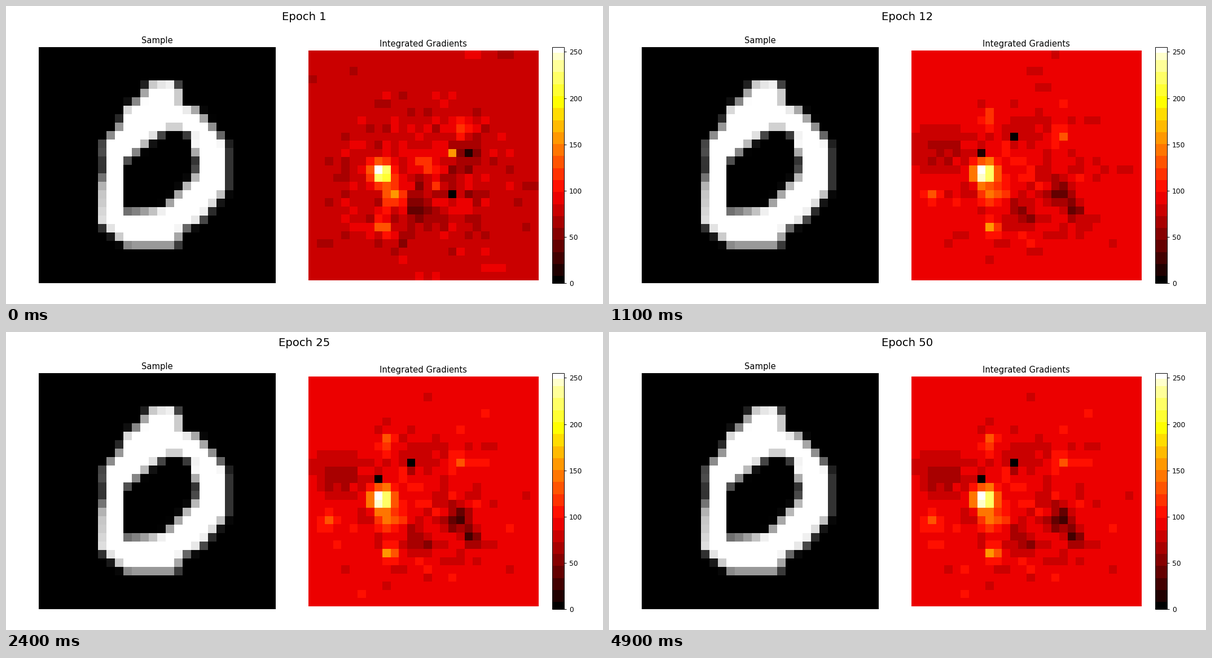
A matplotlib script that plays this animation: 1058x529 px, repeating every 5 s.

```python
import numpy as np
import matplotlib.pyplot as plt
from matplotlib.animation import FuncAnimation
from matplotlib.colors import ListedColormap
from matplotlib.path import Path

W, H = 1058, 529
N = 28
FRAMES = 50
rng = np.random.default_rng(7)

# Contours of the handwritten zero, in cells.
OUTER = [(13.2, 4.2), (15.6, 4), (16.8, 5), (16.8, 7), (18.5, 7.2), (21, 10),
         (22.2, 11.5), (22.2, 17), (19.2, 20.6), (16.9, 21.7), (16.3, 23.6),
         (10.4, 23.6), (7.1, 20.8), (7.3, 16), (7.8, 15), (7.7, 11.2),
         (9.6, 9.4), (10.2, 7.2), (12, 6.2), (12.7, 4.8)]
INNER = [(10, 13.7), (14.2, 10.4), (16, 9.6), (18.1, 10.5), (18, 12),
         (18.8, 13.2), (18.7, 15), (16.6, 17.2), (14.9, 19), (12.5, 19.4),
         (10, 19.6)]

# Salient spots: (row, column, radius, gain).
CORE = [(14.4, 8.4, 0.85, 210)]
EARLY = [(17, 10, 1, 75), (21, 8.5, 0.6, 70), (13.2, 13.8, 0.8, 55),
         (12, 17, 0.4, 75), (8.7, 18, 0.8, 45), (17, 17, 0.4, -78),
         (12, 19, 0.8, -55), (19, 12.8, 0.9, -60)]
LATE = [(17, 9.3, 1, 50), (21, 9.3, 0.6, 75), (7.5, 9, 0.6, 45),
        (17, 2, 0.8, 35), (10, 18, 0.6, 40), (10, 12, 0.5, -90),
        (12, 8, 0.4, -85), (11.5, 3.5, 1.7, -28), (16.8, 17.6, 0.9, -65),
        (19, 19.3, 0.7, -65), (19.7, 12.7, 1.2, -35), (9, 12.5, 1.2, -20)]

yy, xx = np.mgrid[:N, :N]


def bump(row, col, radius):
    return np.exp(-((yy - row) ** 2 + (xx - col) ** 2) / (2 * radius ** 2))


def coverage(points, sub=10):
    """Share of each cell that lies inside a polygon."""
    c = (np.arange(N * sub) + 0.5) / sub
    grid = np.stack(np.meshgrid(c, c), -1).reshape(-1, 2)
    inside = Path(points + points[:1]).contains_points(grid)
    return inside.reshape(N, sub, N, sub).mean((1, 3))


def attribution_map(base, speckle, spots):
    """Faint horizontal streaks, speckle around the digit, and the spots."""
    n = rng.normal(size=(N, N))
    streaks = (n + np.roll(n, 1, 1) + np.roll(n, 2, 1)) / 3 ** 0.5
    field = base + 2.5 * streaks + speckle * near * rng.normal(size=(N, N))
    return field + sum(gain * bump(r, c, size) for r, c, size, gain in spots)


def banded_hot():
    v = np.arange(256)
    colors = plt.get_cmap("hot")(8 + (v - 8) // 13 * 13)
    colors[v < 8] = (0, 0, 0, 1)
    colors[v >= 250] = (1, 1, 1, 1)
    return ListedColormap(colors)


near = bump(14.5, 13, 7)
phase = rng.uniform(0, 2 * np.pi, (N, N))
late = attribution_map(91.5, 9, CORE + LATE)
early = attribution_map(79.5, 13, CORE + EARLY)


def attribution(i):
    i = min(i, FRAMES - 2)
    w = np.exp(-i / 5)
    dip = 14.5 * np.exp(-((i - 4) / 2.2) ** 2)
    wobble = 2 * np.exp(-i / 12) * np.sin(phase + 1.3 * i) * (0.4 + near)
    return np.clip(w * early + (1 - w) * late - dip + wobble, 0, 255)


fig = plt.figure(figsize=(12, 6), dpi=W / 12, facecolor="white")


def panel(x, w, h, mid=282.85):
    """Axes at left edge x, vertically centred on mid, in pixels."""
    return fig.add_axes([x / W, 1 - (mid + h / 2) / H, w / W, h / H])


def show(ax, img, name, **kw):
    ax.set_title(name, fontsize=12)
    ax.axis("off")
    return ax.imshow(img, interpolation="nearest", aspect="auto", **kw)


zero = coverage(OUTER) - coverage(INNER)
show(panel(58.15, 419.2, 419.2), zero, "Sample", cmap="gray", vmin=0, vmax=1)
heat = show(panel(535.6, 407.4, 407.4), attribution(0), "Integrated Gradients",
            cmap=banded_hot(), vmin=0, vmax=255)
fig.colorbar(heat, cax=panel(968.4, 20.96, 419.2), ticks=range(0, 251, 50))
title = fig.suptitle("Epoch 1", x=0.4996, y=0.982, fontsize=16)


def update(i):
    heat.set_data(attribution(i))
    title.set_text(f"Epoch {i + 1}")
    return heat, title


anim = FuncAnimation(fig, update, frames=FRAMES, interval=100, repeat=True, repeat_delay=0)
plt.show()
```
